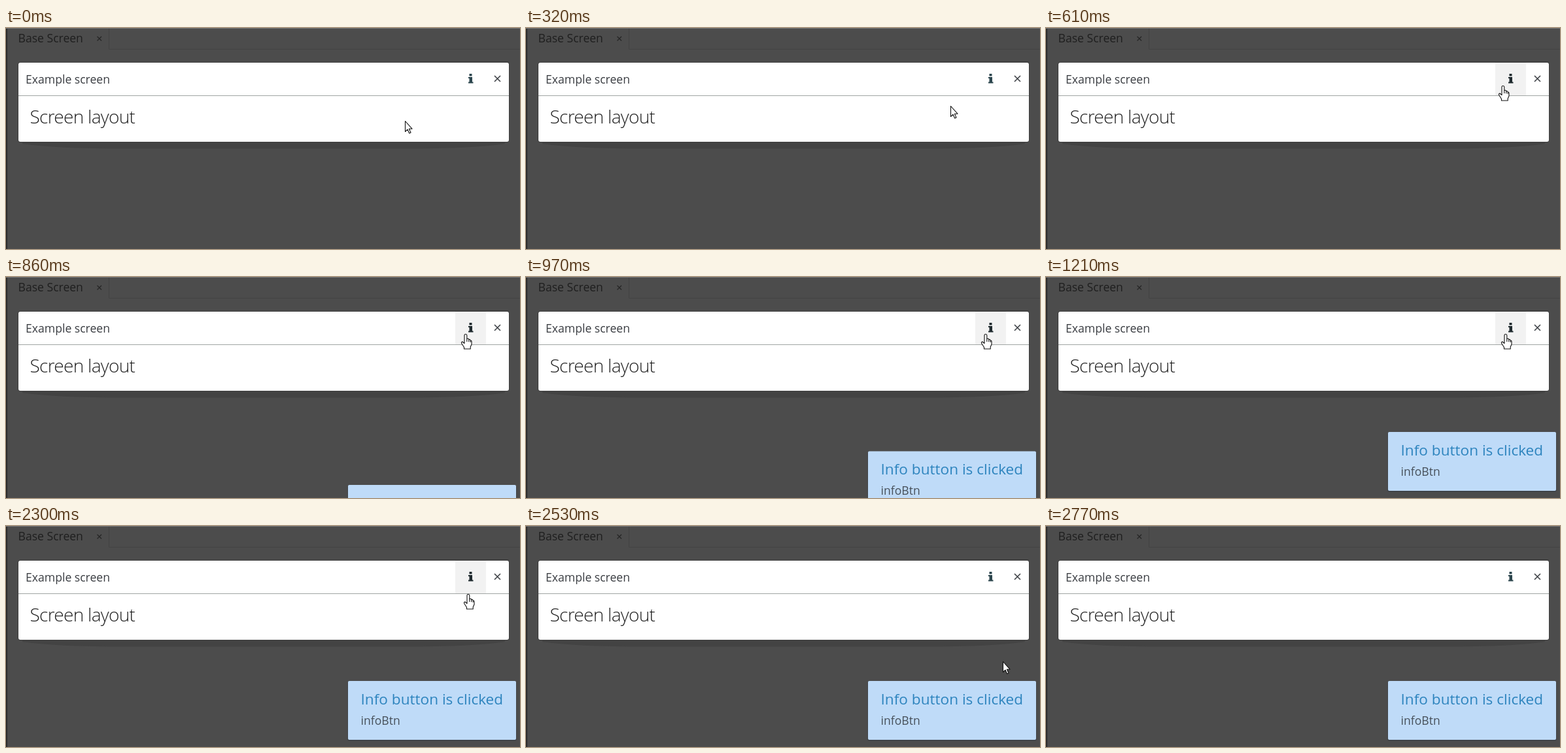
An HTML page for the animation above (3260 ms loop, 786 px wide and 338 px high).

```html
<!DOCTYPE html>
<html lang="en">
<head>
<meta charset="utf-8">
<title>Info button dialog</title>
<style>
  html, body { margin: 0; width: 100%; height: 100%; overflow: hidden; background: #4c4c4c; }
  svg { display: block; width: 100%; height: 100%; }
  text { font: 400 17.6px "Open Sans", "Noto Sans", sans-serif; white-space: pre; }
  .title { font-weight: 500; }
  .layout { font-size: 28px; font-weight: 300; letter-spacing: -.7px; }
  .caption { font-size: 22.6px; }
</style>
</head>
<body>
<svg viewBox="0 0 786 338">
  <rect width="786" height="338" fill="#4c4c4c"/>
  <path d="M157.5 1V32.5H786" fill="none" stroke="#434343"/>
  <path d="M0 .5H786" stroke="#767676"/>
  <path d="M1 1V338" stroke="#2b2b2b" stroke-width="2"/>
  <text class="title" x="18.5" y="21.5" fill="#1f1f1f">Base Screen</text>
  <path d="M139.5 13l6.5 6.5m0-6.5l-6.5 6.5" stroke="#262626" stroke-width="1.3"/>

  <path d="M25 174V177Q75 184.5 180 184.5H610Q715 184.5 763 177V174Z" fill="#434343"/>
  <path d="M633 51.5H769" stroke="#414141"/>
  <rect x="18" y="52" width="752" height="123" rx="4" fill="#404040"/>
  <rect x="19" y="53" width="750" height="121" rx="3" fill="#fff"/>
  <rect id="hover" x="687" y="53" width="47" height="50" fill="#f2f2f2"/>
  <path d="M19 103.5H769" stroke="#a0a5a3"/>
  <text class="title" x="30" y="84.5" fill="#3a3d42">Example screen</text>
  <text class="layout" x="36.5" y="146" fill="#222">Screen layout</text>
  <path id="info" d="M708.5 70h4v3.5h-4zM707 75h6v7.5h1.5v2h-7.5v-2h1.5v-5.5h-1.5z"/>
  <path d="M747 73l9 9m0-9l-9 9" stroke="#3a3d42" stroke-width="1.5"/>

  <g id="toast">
    <rect x="522" y="1" width="259" height="91" rx="3" fill="#404448"/>
    <rect x="523" width="257" height="90" rx="2" fill="#bfdbf8"/>
    <text class="caption" x="542.5" y="35.5" fill="#2d84be">Info button is clicked</text>
    <text x="542.5" y="66.5" fill="#47505a">infoBtn</text>
  </g>

  <g id="cursor" fill="#fff" stroke="#111" stroke-width="1.1" stroke-linejoin="round">
    <path id="arrow" d="M.5 .5V16.5L4 13.2L6.7 19L9 18L6.4 12.2H11Z"/>
    <g id="hand">
      <path d="M-2 2Q-2 .5 -.2 .5T1.8 2V7.5Q4.3 6.5 4.8 8.6Q7 8 7.3 10Q9 9.8 9 11.8V16L7.2 20V23H-2.5V20.5L-6.3 14.5Q-7 12.3 -5 12L-2 14.5Z"/>
      <path d="M1.8 7.5V12M4.8 8.6V12.3M7.3 10V12.8" fill="none"/>
    </g>
  </g>
</svg>
<script>
const LOOP = 3260;
const $ = id => document.getElementById(id);
const show = (id, on) => $(id).setAttribute("display", on ? "inline" : "none");
const move = (id, x, y) => $(id).setAttribute("transform", `translate(${x} ${y})`);
const lerp = (a, b, u) => a + (b - a) * u;

// The screen refreshes only at these moments.
const ticks = [0, 110, 160, 220, 270, 320, 380, 440, 500, 550, 610, 650,
  860, 920, 970, 1030, 1090, 1150, 1210,
  2300, 2360, 2420, 2480, 2530, 2590, 2650, 2710, 2770];
const approach = [[60, 610, 142], [320, 649, 119], [610, 699, 88], [650, 703, 87]];

function pointer(t) {
  if (t >= 2300) {
    const u = ((t - 2240) / 530) ** 1.23;
    return [703 + 55 * u, 87 + 251 * u];
  }
  const i = approach.findIndex(k => k[0] > t);
  if (i < 0) return [703, 87];
  if (i === 0) return [610, 142];
  const [a, b] = [approach[i - 1], approach[i]];
  const u = (t - a[0]) / (b[0] - a[0]);
  return [lerp(a[1], b[1], u), lerp(a[2], b[2], u)];
}

function draw(ms) {
  const t = ticks.findLast(k => k <= ms);
  const over = t >= 550 && t <= 2300;
  const [x, y] = pointer(t).map(Math.round);
  show("hover", over);
  $("info").setAttribute("fill", over ? "#1f2a2e" : "#2c464e");
  show("hand", over);
  show("arrow", !over);
  show("cursor", t < 2770);
  move("cursor", x, y);
  show("toast", t >= 860);
  move("toast", 0, 237 + 81 * Math.max(0, (1245 - t) / 385) ** 3);
}

const start = performance.now();
function tick() {
  draw((performance.now() - start) % LOOP);
  requestAnimationFrame(tick);
}
tick();
</script>
</body>
</html>
```
